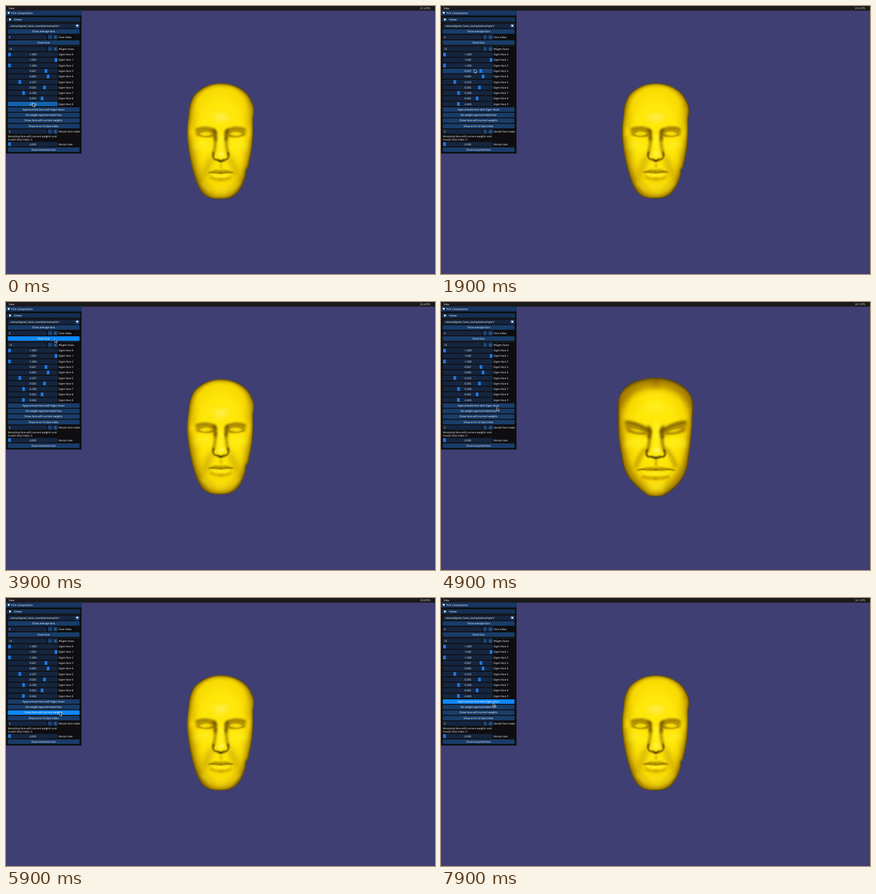
An HTML page for the animation above (8000 ms loop, 800 by 500 pixels).

```html
<!DOCTYPE html>
<html lang="en">
<head>
<meta charset="utf-8">
<title>PCA Computation</title>
<style>
html, body { margin: 0; width: 100%; height: 100%; overflow: hidden; background: #3f3f73; }
svg { position: absolute; left: 0; top: 0; }
text { font: 4.9px "Open Sans", "Noto Sans", sans-serif; fill: #fff; text-rendering: geometricPrecision; white-space: pre; }
.mid { text-anchor: middle; }
.field { fill: #15253f; }
.btn { fill: #193c69; }
.grab { fill: #1f79df; }
.field.hover { fill: #193f70; }
.field.held { fill: #1262ad; }
.btn.hover { fill: #0f87fa; }
</style>
</head>
<body>
<svg id="scene" width="800" height="500" viewBox="0 0 800 500"></svg>
<svg id="ui" width="800" height="500" viewBox="0 0 800 500"></svg>
<script>
const $ = id => document.getElementById(id);

// Face shading: blurred strokes and fills; width 0 means fill
const soft = (d, color, width, blur, opacity = 1) =>
  `<path d="${d}" fill="${width ? 'none' : color}" stroke="${width ? color : 'none'}" stroke-width="${width}"
    stroke-linecap="round" filter="url(#blur${blur})" opacity="${opacity}"/>`;

const face = (id, outline, half, centre) => `
  <clipPath id="${id}Clip"><path d="${outline}"/></clipPath>
  <g id="${id}"><g clip-path="url(#${id}Clip)">
    <path d="${outline}" fill="url(#skin)"/>
    <g id="${id}Half">${half}</g>
    <use href="#${id}Half" transform="matrix(-1 0 0 1 801 0)"/>
    ${centre}
    ${soft(outline, '#7a5c00', 7, 3, .7)}
    ${soft(outline, '#3a2c00', 2.6, 1, .8)}
  </g></g>`;

const shade = '#a07800', deep = '#5c4400', lit = '#fff22a';

const narrow = face('narrow',
  'M400 144 C380 144 361 153 350 167 C342 180 340 195 340 206 C337 220 337 238 338 252 C341 278 346 302 353 322 ' +
  'C357 334 362 344 368 350 C376 357 388 360 399 359 C412 360 422 356 429 350 C436 344 441 334 444 325 ' +
  'L447 317 L448 306 L452 300 L454 290 C459 270 461 250 461 230 L461 208 C464 198 463 187 459 179 C450 156 426 144 400 144Z',
  soft('M334 236 Q350 246 353 272 Q358 318 380 346 L376 366 L330 366Z', shade, 0, 6, .6) +
  soft('M340 172 Q349 198 346 226', shade, 7, 6, .5) +
  soft('M354 231 Q372 223 391 232 L392 246 Q372 240 354 242Z', shade, 0, 2, .7) +
  soft('M355 230 Q368 225 380 228 Q388 230 392 236', deep, 3, 2, .75) +
  soft('M388 231 Q392 238 390 249', deep, 5, 2, .75) +
  soft('M360 239 Q372 230 384 238 Q373 245 360 239Z', '#ffe60a', 0, 1, .85) +
  soft('M359 240 Q371 247 386 241', shade, 2, 1, .8) +
  soft('M391 246 Q390 264 386 278', deep, 4, 2, .65) +
  soft('M352 262 Q364 252 378 262', lit, 9, 6, .7) +
  soft('M387 273 Q384 283 390 286 Q395 285 401 289', deep, 3, 1, .85) +
  soft('M383 284 Q374 298 371 316', shade, 8, 6, .6) +
  soft('M379 310 Q390 303 397 305 L401 306 L401 311 Q388 310 379 310Z', shade, 0, 1, .6) +
  soft('M378 310 Q388 309 396 311 L401 310.5', deep, 1.6, 1, .9) +
  soft('M386 315 Q393 317 401 316', lit, 3, 1, .8) +
  soft('M382 319 Q391 324 401 323', shade, 3, 2, .75) +
  soft('M366 330 Q374 336 380 344', lit, 5, 3, .6),
  soft('M384 207 Q400 196 417 207 Q400 220 384 207Z', '#fff48a', 0, 6, .7) +
  soft('M401 242 L401 270', lit, 6, 2, .9) +
  soft('M400 276 L403 276', '#fff56c', 8, 2, .8) +
  soft('M394 288 Q401 291 408 288', '#4a3600', 2, 1, .75) +
  soft('M401 294 L401 302', shade, 3, 2, .6) +
  soft('M391 340 Q401 344 411 340', lit, 8, 6, .6));

const wide = face('wide',
  'M400 141 C383 141 362 146 350 154 C338 163 331 174 330 187 C330 207 330 235 331 254 C333 268 335 280 337 290 ' +
  'C339 308 345 322 354 333 C365 345 376 355 386 361 C395 364 407 364 415 361 C428 354 440 345 449 331 ' +
  'C458 317 461 303 463 282 C466 262 469 235 469 214 C471 198 471 185 466 174 C455 153 426 141 400 141Z',
  soft('M326 226 Q342 240 344 266 Q348 312 384 350 L380 368 L322 368Z', shade, 0, 6, .6) +
  soft('M331 190 Q350 155 401 151', shade, 15, 6, .85) +
  soft('M336 162 Q362 144 401 142', deep, 8, 3, .7) +
  soft('M340 222 Q364 222 392 238 L390 250 Q366 244 345 242Z', shade, 0, 3, .8) +
  soft('M346 224 Q362 226 374 232 Q384 238 391 242', deep, 4, 2, .7) +
  soft('M387 234 Q392 241 388 252', deep, 6, 2, .75) +
  soft('M352 236 Q366 235 378 243 Q364 244 352 236Z', '#ffe20a', 0, 1, .7) +
  soft('M349 240 Q364 248 382 245', shade, 2.4, 1, .8) +
  soft('M389 250 Q389 266 384 279', deep, 5, 2, .65) +
  soft('M346 266 Q358 256 372 266', lit, 10, 6, .75) +
  soft('M385 276 Q380 285 387 289 Q393 287 401 291', deep, 3.4, 1, .9) +
  soft('M380 276 Q369 288 364 306', shade, 8, 3, .55) +
  soft('M368 313 Q388 306 397 308 L401 309 L401 314 Q381 312 368 313Z', shade, 0, 1, .6) +
  soft('M366 314 Q373 311 382 313 Q392 314 401 313', deep, 1.7, 1, .9) +
  soft('M379 319 Q390 321 401 320', lit, 4, 2, .8) +
  soft('M376 326 Q388 330 401 329', shade, 4, 2, .75),
  soft('M378 196 Q400 180 423 196 Q400 212 378 196Z', lit, 0, 6, .75) +
  soft('M401 224 L401 270', lit, 7, 2, .85) +
  soft('M399 277 L404 277', '#fff56c', 9, 2, .8) +
  soft('M393 290 Q401 294 409 290', '#4a3600', 2, 1, .75) +
  soft('M401 296 L401 306', shade, 4, 2, .6) +
  soft('M391 343 Q401 347 411 343', lit, 11, 6, .8));

const blur = (n, sd) => `<filter id="blur${n}" filterUnits="userSpaceOnUse" x="290" y="110" width="220" height="290"
  color-interpolation-filters="sRGB"><feGaussianBlur stdDeviation="${sd}"/></filter>`;

$('scene').innerHTML = `<defs>
  <radialGradient id="skin" gradientUnits="userSpaceOnUse" r="1" gradientTransform="translate(400.5 242) scale(72 122)" cx="0" cy="0">
    <stop offset=".5" stop-color="#ffe70a"/><stop offset=".78" stop-color="#f8d800"/><stop offset="1" stop-color="#c49c00"/>
  </radialGradient>${blur(1, .8)}${blur(2, 2)}${blur(3, 3)}${blur(6, 6)}</defs>${narrow}${wide}`;

// Control panel
const H = 8.5;
const hot = [];
const rect = (x, y, w, h, attr) => `<rect x="${x}" y="${y}" width="${w}" height="${h}" ${attr}/>`;
const label = (x, y, s, attr = '') => `<text x="${x}" y="${y + 1.75}" ${attr}>${s}</text>`;
const box = (x, y, w, cls) => {
  const id = 'hot' + hot.length;
  hot.push({ x, y: y - H / 2, w, id });
  return rect(x, y - H / 2, w, H, `class="${cls}" id="${id}" rx="1.6"`);
};
const button = (y, s) => box(3.2, y, 134, 'btn') + label(70, y, s, 'class="mid"');
const stepper = (y, value, name) => box(3.2, y, 73, 'field') + label(5.6, y, value) +
  box(78, y, H, 'btn') + label(82.2, y, '-', 'class="mid"') +
  box(88, y, H, 'btn') + label(92.2, y, '+', 'class="mid"') + label(98.3, y, name);
const grabX = v => 47.4 + 43.4 * v;
const slider = (y, v, name, key, at = v) => box(3.2, y, 93.2, 'field') +
  rect(grabX(at), y - 3.5, 5, 7, `class="grab" id="${key}Grab" rx=".5"`) +
  label(50, y, v.toFixed(3), `class="mid" id="${key}Value"`) + label(98.3, y, name);
const rule = y => rect(3.2, y, 134, .5, 'fill="#303038"');

const weights = [-1, 1, -1, .567, .66, -.557, .505, -.392, .402, -.402];
$('ui').innerHTML =
  rect(0, 0, 800, 8.6, 'fill="#1a1a1c"') + label(5, 4.2, 'View') +
  label(791, 4.2, '31.5 FPS', 'id="fps" text-anchor="end"') +
  rect(0, 8.8, 140.8, 266.4, 'fill="#0e0e11"') + rect(0, 8.8, 140.8, 8.8, 'fill="#183663"') +
  label(10, 13.2, 'PCA Computation') +
  rect(1.6, 21, 137, H, 'fill="#152f52" rx="1.6"') + label(15, 25.2, 'Viewer') + rule(31.4) +
  box(3.2, 37.2, 134, 'field') + rect(128.7, 33, H, H, 'class="btn" rx="1.6"') +
  '<path d="M2.6 11.3H7.6L5.1 15.6ZM6 22.7L10.3 25.2L6 27.7ZM130.4 35.3H135.4L132.9 39.5Z" fill="#fff"/>' +
  label(5.6, 37.2, '../data/aligned_faces_example/example1/') +
  button(47.6, 'Show average face') + stepper(57.9, '0', 'Face index') + button(68.2, 'Show face') + rule(74) +
  stepper(80.1, '10', '#Eigen faces') +
  weights.map((w, i) => slider(90.4 + 10.27 * i, w, 'Eigen face ' + i, 'w' + i)).join('') +
  ['Approximate face with Eigen faces', 'Set weight approximated face', 'Show face with current weights',
    'Show error to face index'].map((s, i) => button(193.2 + 10.25 * i, s)).join('') +
  stepper(234.2, '0', 'Morph face index') +
  label(3.6, 243.2, 'Morphing face with current weights and') + label(3.6, 249, 'morph face index: 0') +
  slider(257.8, 0, 'Morph rate', 'morph', -1) + button(268.1, 'Show morphed face') +
  '<path id="cursor" d="M0 0V6.6L1.6 5.2L2.7 7.7L3.9 7.2L2.8 4.8H4.9Z" fill="#000" stroke="#fff" stroke-width=".7"/>';

// Timing; the panel reacts slightly after the pointer
const LOOP = 8000, LAG = 150;
const moves = [[0, 50, 181], [700, 33, 182], [1000, 33, 182], [1900, 62, 118], [2400, 103.5, 69], [2800, 103.5, 69],
  [3700, 91, 68.5], [4100, 91, 68.5], [4700, 104, 198.3], [4900, 104, 196.3], [5100, 104, 196.3], [5500, 100, 212.5],
  [6200, 100, 212.5], [6500, 99.5, 216], [6700, 99.5, 216], [7400, 97, 195.5], [LOOP, 97, 195.5]];
const rates = [[0, 31.5], [2000, 25.9], [2900, 24], [3800, 22.4], [4700, 20.1], [5600, 19.9], [6900, 17.8], [7700, 16.1]];
const ease = p => p * p * (3 - 2 * p);

function pointer(t) {
  const i = moves.findIndex(m => m[0] > t);
  const [t0, x0, y0] = moves[i - 1], [t1, x1, y1] = moves[i];
  const p = ease((t - t0) / (t1 - t0));
  return [x0 + (x1 - x0) * p, y0 + (y1 - y0) * p];
}

function draw(t) {
  const [x, y] = pointer(t);
  $('cursor').setAttribute('transform', `translate(${x} ${y})`);

  const [hx, hy] = pointer(Math.max(0, t - LAG));
  const dragging = t < 800;
  for (const b of hot) {
    const over = hx >= b.x && hx < b.x + b.w && hy >= b.y && hy < b.y + H;
    const list = $(b.id).classList;
    list.toggle('hover', over);
    list.toggle('held', over && dragging);
  }
  const w = t < 700 ? -.02 - .382 * (50 - x) / 17 : -.402;
  $('w9Grab').setAttribute('x', grabX(w));
  $('w9Value').textContent = w.toFixed(3);
  $('fps').textContent = rates.findLast(r => r[0] <= t)[1].toFixed(1) + ' FPS';

  const other = t >= 4100 && t < 5700;
  $('wide').style.display = other ? '' : 'none';
  $('narrow').style.display = other ? 'none' : '';
  const stretch = 1 + (w + .402) * .013;
  $('narrow').setAttribute('transform', `translate(0 ${144 * (1 - stretch)}) scale(1 ${stretch})`);
}

let last = -1;
const start = performance.now();
function tick() {
  const t = Math.floor((performance.now() - start) % LOOP / 100) * 100;
  if (t !== last) draw(last = t);
  requestAnimationFrame(tick);
}
tick();
</script>
</body>
</html>
```
